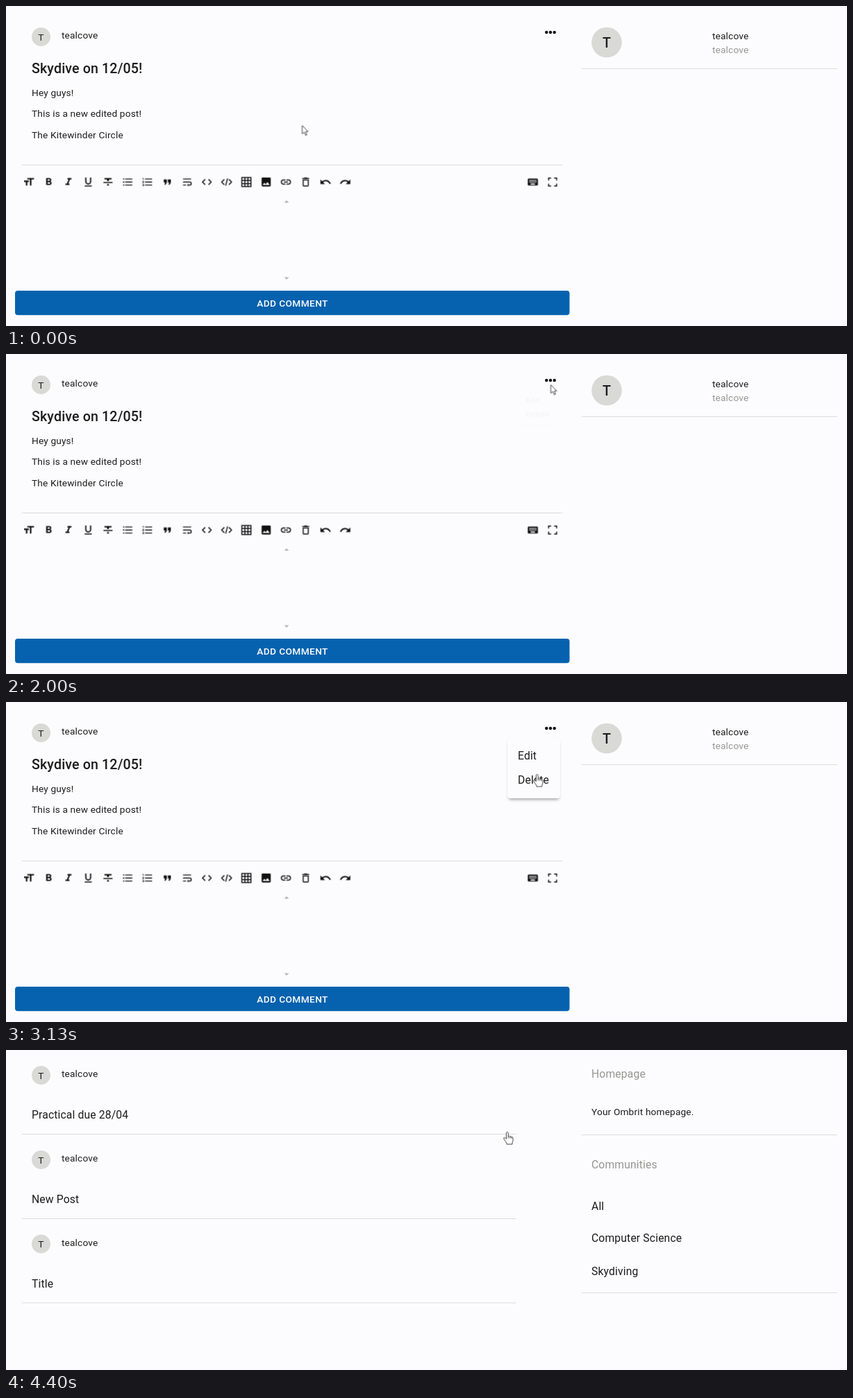
These frames come from a looping animation (1211x462 px, 4.73 s). An HTML page:

```html
<!DOCTYPE html>
<html lang="en">
<head>
<meta charset="utf-8">
<title>Deleting a post</title>
<style>
  html, body { margin: 0; width: 100%; height: 100%; overflow: hidden; background: #fcfcfe; }
  body { position: relative; font: 13.7px Roboto, sans-serif; letter-spacing: .147px; }
  svg { position: absolute; left: 0; top: 0; }
  text { fill: #1c1c1c; }
  .title { font-size: 19.6px; font-weight: 500; }
  .mid { font-size: 15.7px; }
  .soft { fill: #969692; }
  .avatar circle { fill: #d9d9d5; }
  .avatar text, .cta text { text-anchor: middle; }
  .cta rect { fill: #0662ae; }
  .cta text { fill: #fff; font-weight: 500; letter-spacing: .39px; }
  .rule { stroke: #dcdcde; }
  .icons { fill: #111; }
  .line { fill: none; stroke: #111; stroke-width: 2; }

  .post, .head, .body, .feed, .spinner, .spinner circle,
  .menu, .paper, .cursor, .arrow, .hand { animation: 4730ms step-end infinite; }

  .post { animation-name: post; }
  @keyframes post { 0% { opacity: 1 } 81.4%, 100% { opacity: 0 } }
  .feed { animation-name: feed; }
  @keyframes feed { 0% { opacity: 0 } 81.4%, 100% { opacity: 1 } }
  .head { animation-name: head; }
  @keyframes head { 0% { opacity: 1 } 76.53%, 100% { opacity: 0 } }
  .body { animation-name: lift; }
  @keyframes lift { 0% { transform: none } 76.53%, 100% { transform: translateY(-19.6px) } }

  .spinner { animation-name: wait; }
  @keyframes wait { 0% { opacity: 0 } 76.53% { opacity: 1 } 81.4%, 100% { opacity: 0 } }
  .spinner circle {
    fill: none; stroke: #0662ae; stroke-width: 3.2;
    animation-name: turn, dash; animation-timing-function: linear, ease-in;
  }
  @keyframes turn { 0%, 76.53% { transform: rotate(0) } 81.4%, 100% { transform: rotate(59deg) } }
  @keyframes dash {
    0%, 76.53% { stroke-dasharray: 1 200; stroke-dashoffset: 0 }
    81.4%, 100% { stroke-dasharray: 22 200; stroke-dashoffset: -3 }
  }

  .menu { position: absolute; left: 722px; top: 52px; animation-name: menu; }
  @keyframes menu { 0% { opacity: 0 } 41.65% { opacity: 1 } 75.48%, 100% { opacity: 0 } }
  .paper {
    box-sizing: border-box; width: 76px; height: 87px; padding: 8px 15px;
    font-size: 15.7px; line-height: 35.3px; color: #1c1c1c;
    background: #fcfcfe; border-radius: 4px; transform-origin: 62px 0;
    box-shadow: 0 4px 4px -2px rgba(0, 0, 0, .35), 0 0 1px rgba(0, 0, 0, .12);
    animation-name: grow; animation-timing-function: cubic-bezier(.4, 0, .2, 1);
  }
  @keyframes grow {
    0%, 41.65% { opacity: 0; transform: scale(.75, .5625) }
    46.9%, 100% { opacity: 1; transform: none }
  }

  .cursor { fill: #fff; stroke: #333; stroke-width: .9; stroke-linejoin: round;
    animation-name: move; animation-timing-function: linear; }
  @keyframes move {
    0%, 9.09% { transform: translate(426.5px, 172.5px); animation-timing-function: cubic-bezier(.4, 0, .6, .77) }
    20.51% { transform: translate(704px, 100.5px); animation-timing-function: cubic-bezier(.3, .4, .5, 1) }
    30.23%, 45.45% { transform: translate(784.5px, 44.5px) }
    48.41%, 51.37% { transform: translate(780.5px, 43.5px); animation-timing-function: ease-in }
    63.42% { transform: translate(770px, 94px) }
    66.17% { transform: translate(765px, 104.500px); animation-timing-function: ease-out }
    69.13%, 78.22% { transform: translate(757px, 110.500px); animation-timing-function: ease-in }
    86.05% { transform: translate(735px, 116.500px); animation-timing-function: ease-out }
    93.02%, 100% { transform: translate(722px, 118.500px) }
  }
  .arrow { animation-name: arrow; }
  @keyframes arrow {
    0%, 41.65%, 75.48% { opacity: 1 }
    26.22%, 56.03%, 86.05%, 100% { opacity: 0 }
  }
  .hand { animation-name: hand; }
  @keyframes hand {
    0%, 41.65%, 75.48% { opacity: 0 }
    26.22%, 56.03%, 86.05%, 100% { opacity: 1 }
  }
</style>
</head>
<body>
<svg width="1211" height="462" viewBox="0 0 1211 462">
  <g class="post">
    <g class="head">
      <g class="avatar"><circle cx="50.5" cy="44.5" r="13.5"/><text x="50.5" y="49.500">T</text></g>
      <text x="80" y="47">tealcove</text>
      <path d="M778.300 38h0m5.700 0h0m5.700 0h0" stroke="#111" stroke-width="4.500" stroke-linecap="round"/>
    </g>
    <g class="spinner"><g transform="translate(412 36)"><circle r="18"/></g></g>

    <g class="body">
      <text class="title" x="37" y="97">Skydive on 12/05!</text>
      <text x="37" y="129.500">Hey guys!</text>
      <text x="37" y="160">This is a new edited post!</text>
      <text x="37" y="191">The Kitewinder Circle</text>
      <path class="rule" d="M23 229.500H801"/>

      <g class="icons" transform="translate(24.200 245.300) scale(.73)">
        <path d="M9 4v3h5v12h3V7h5V4zM3 12h3v7h3v-7h3V9H3z"/>
        <path transform="translate(39)" d="M15.600 10.800c1-.7 1.650-1.800 1.650-2.800 0-2.260-1.750-4-4-4H7v14h7c2.100 0 3.750-1.700 3.750-3.800 0-1.500-.9-2.800-2.150-3.400zM10 6.500h3a1.500 1.500 0 0 1 0 3h-3zm3.500 9H10v-3h3.500a1.500 1.500 0 0 1 0 3z"/>
        <path transform="translate(78)" d="M10 4v3h2.200l-3.400 8H6v3h8v-3h-2.200l3.400-8H18V4z"/>
        <path transform="translate(117)" d="M12 17a6 6 0 0 0 6-6V3h-2.500v8a3.500 3.500 0 0 1-7 0V3H6v8a6 6 0 0 0 6 6zM5 19v2h14v-2z"/>
        <path transform="translate(156)" d="M10 19h4v-3h-4zM5 4v3h5v3h4V7h5V4zM3 14h18v-2H3z"/>
        <path transform="translate(195)" class="line" d="M7 6h14M7 12h14M7 18h14M2.500 6h3M2.500 12h3M2.500 18h3"/>
        <g transform="translate(234)">
          <path class="line" d="M7 6h14M7 12h14M7 18h14"/>
          <path d="M2 17h2v.5H3v1h1v.5H2v1h3v-4H2zM3 8h1V4H2v1h1zM2 11h1.800L2 13.100v.9h3v-1H3.200L5 10.900V10H2z"/>
        </g>
        <path transform="translate(273)" d="M6 17h3l2-4V7H5v6h3zM14 17h3l2-4V7h-6v6h3z"/>
        <g transform="translate(312)">
          <path class="line" d="M4 6h16M4 18h6M4 12h13.200a3 3 0 0 1 0 6H15"/>
          <path d="M15 15l-3 3 3 3z"/>
        </g>
        <path transform="translate(351)" class="line" d="M8.700 6.700L3.400 12l5.300 5.300M15.300 6.700l5.300 5.300-5.300 5.300"/>
        <path transform="translate(390)" class="line" d="M7.500 6.700L2.200 12l5.300 5.300M16.500 6.700l5.300 5.300-5.300 5.300M13.800 5l-3.600 14"/>
        <path transform="translate(429)" class="line" d="M3 3h18v18H3zM3 9h18M3 15h18M9 3v18M15 3v18"/>
        <path transform="translate(468)" d="M21 19V5a2 2 0 0 0-2-2H5a2 2 0 0 0-2 2v14a2 2 0 0 0 2 2h14a2 2 0 0 0 2-2zM8.500 13.500l2.500 3 3.500-4.500 4.500 6H5z"/>
        <path transform="translate(507)" class="line" d="M11 8H7a4 4 0 0 0 0 8h4M13 8h4a4 4 0 0 1 0 8h-4M8 12h8"/>
        <path transform="translate(546)" class="line" d="M5 5h14M9 4h6M7 8h10v11a1 1 0 0 1-1 1H8a1 1 0 0 1-1-1z"/>
        <path id="undo" transform="translate(585)" d="M12.500 8c-2.650 0-5 1-6.900 2.600L2 7v9h9l-3.600-3.600c1.400-1.200 3.100-1.900 5.100-1.900 3.500 0 6.500 2.300 7.600 5.500l2.400-.8C21.100 11 17.100 8 12.500 8z"/>
        <use href="#undo" transform="translate(1233) scale(-1 1)"/>
        <g transform="translate(994)">
          <rect x="2" y="5" width="20" height="14" rx="2"/>
          <path d="M5 9h14M5 12h14M8 16h8" fill="none" stroke="#fcfcfe" stroke-width="2" stroke-dasharray="2 1 2 1 2 1 2 1 2 20"/>
          <path d="M8 16h8" stroke="#fcfcfe" stroke-width="2"/>
        </g>
        <path transform="translate(1033)" class="line" d="M4 9V4h5M15 4h5v5M20 15v5h-5M9 20H4v-5"/>
      </g>

      <path d="M400.500 284h7l-3.500-3.500zM400.500 391.500h7l-3.500 3.500z" fill="#b9b9b7"/>
      <g class="cta">
        <rect x="13" y="411" width="798.500" height="35.300" rx="4"/>
        <text x="412.500" y="433.700">ADD COMMENT</text>
      </g>
    </g>

    <g class="avatar"><circle cx="865" cy="52.500" r="21.800"/><text x="865" y="60" style="font-size:19.600px;font-weight:500">T</text></g>
    <text x="1017" y="48">tealcove</text>
    <text class="soft" x="1017" y="67.500">tealcove</text>
    <path class="rule" d="M829 90.500H1197"/>
  </g>

  <g class="feed">
    <g id="row">
      <g class="avatar"><circle cx="50.500" cy="36.500" r="13.500"/><text x="50.500" y="41.500">T</text></g>
      <text x="80" y="39">tealcove</text>
      <path class="rule" d="M23 121.500H735"/>
    </g>
    <use href="#row" y="122"/>
    <use href="#row" y="243.500"/>
    <g class="mid">
      <text x="37" y="99">Practical due 28/04</text>
      <text x="37" y="220.700">New Post</text>
      <text x="37" y="342.500">Title</text>
      <text class="soft" x="843" y="40">Homepage</text>
      <text class="soft" x="843" y="170.500">Communities</text>
      <text x="843" y="230.500">All</text>
      <text x="843" y="277.300">Computer Science</text>
      <text x="843" y="324.500">Skydiving</text>
    </g>
    <text x="843" y="93.500">Your Ombrit homepage.</text>
    <path class="rule" d="M829 122.500H1197M829 350.500H1197"/>
  </g>
</svg>

<div class="menu"><div class="paper">Edit<br>Delete</div></div>

<svg width="1211" height="462" viewBox="0 0 1211 462">
  <g class="cursor">
    <path class="arrow" d="M0 0V12.200L2.900 9.600 4.900 14.300 6.900 13.400 4.900 8.900H8.600z"/>
    <g class="hand">
      <path d="M-1.600 1.400a1.400 1.400 0 0 1 2.800 0V6q1.400-.9 2.500.5 1.400-.7 2.300.6 1.800-.4 2 1.500V12q0 1.500-1 3v2.500H-1V16q-1-1.400-2.200-3.200l-2-3q-.6-1.600.8-1.800 1.200 0 2.800 2z"/>
      <path fill="none" d="M1.200 6v3M3.700 6.500v2.500M6 7.100v2.400"/>
    </g>
  </g>
</svg>
</body>
</html>
```
